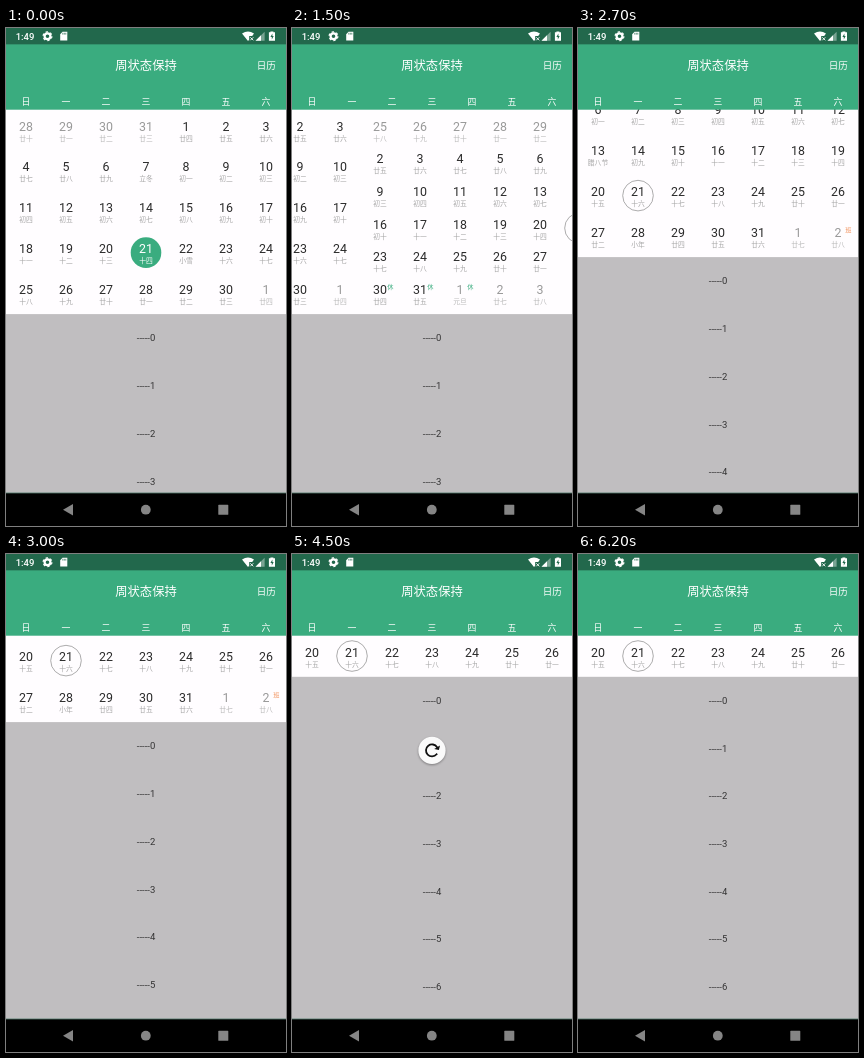
These frames come from a looping animation (280 px wide and 498 px high, 8000 ms). An HTML page:

```html
<!DOCTYPE html>
<html lang="zh-CN">
<head>
<meta charset="utf-8">
<style>
html, body { margin: 0; width: 100%; height: 100%; overflow: hidden; background: #000; }
svg { display: block; }
text { font-family: Roboto, "Noto Sans CJK SC", "Noto Sans CJK", sans-serif; text-anchor: middle; }
#disc { filter: drop-shadow(0 1px 1.2px rgba(0, 0, 0, .35)); }
</style>
</head>
<body>
<svg id="stage" width="280" height="498" viewBox="0 0 280 498">
  <rect y="81" width="280" height="206" fill="#fffdff"/>
  <g id="pager"></g>
  <svg id="list" width="280" height="460">
    <rect width="280" height="460" fill="#c0bec0"/>
    <g id="items" font-size="9.5" fill="#333"></g>
    <g id="spinner">
      <circle id="disc" r="13.6" fill="#fafafa"/>
      <path id="arc" fill="none" stroke="#111" stroke-width="1.8" stroke-linecap="square"/>
      <path id="arrow" d="M-3.4 0H3.4L0 3.4Z" fill="#111"/>
    </g>
  </svg>
  <rect width="280" height="81.7" fill="#3aac7f"/>
  <rect width="280" height="16.35" fill="#22684c"/>
  <g id="header" fill="#fff">
    <text x="19" y="11.8" font-size="9.5" font-weight="500">1:49</text>
    <circle cx="41.5" cy="8.2" r="2.9" fill="none" stroke="#fff" stroke-width="2.2"/>
    <circle cx="41.5" cy="8.2" r="4.4" fill="none" stroke="#fff" stroke-width="1.2" stroke-dasharray="2.3 2.3"/>
    <path d="M56.5 3.7H61.3V12.6H54.2V6.2Z"/>
    <path d="M56.8 4.8v1.8M58.3 4.8v1.8M59.8 4.8v1.8" stroke="#22684c" stroke-width=".7"/>
    <path d="M236 5.6Q242 1.6 248 5.6L246.2 7.9H243.2V11.7L242 13Z"/>
    <path d="M244.3 9.3l3 3m0-3l-3 3" stroke="#fff" stroke-width=".9"/>
    <path d="M249.5 12.8L258.6 3.7V12.8Z" opacity=".4"/>
    <path d="M249.5 12.8L255 7.3V12.8Z"/>
    <path d="M264.4 4.3V3.4H267.4V4.3H269V12.8H262.9V4.3Z"/>
    <path d="M266.4 5.5L264.4 9H265.8V11.6L267.7 8.1H266.4Z" fill="#22684c"/>
    <text x="140" y="41.8" font-size="12.3">周状态保持</text>
    <text x="260.3" y="40.7" font-size="9.5">日历</text>
  </g>
  <rect y="464.7" width="280" height="1" fill="#245a48"/>
  <rect y="465.4" width="280" height="33" fill="#000"/>
  <g fill="#858585">
    <path d="M57 481.7L67 476V487.4Z"/>
    <circle cx="139.8" cy="481.7" r="4.9"/>
    <rect x="212.3" y="476.8" width="10" height="10" rx=".6"/>
  </g>
</svg>
<script>
const NS = 'http://www.w3.org/2000/svg';
const $ = id => document.getElementById(id);

function add(parent, tag, attrs, content = '') {
  const node = document.createElementNS(NS, tag);
  for (const key in attrs) node.setAttribute(key, attrs[key]);
  node.textContent = content;
  parent.append(node);
  return node;
}

const DAY = 864e5, GREEN = '#3aac7f';
const utc = (y, m, d) => Date.UTC(y, m - 1, d);
const newMoons = [utc(2018, 10, 9), utc(2018, 11, 8), utc(2018, 12, 7), utc(2019, 1, 6)];
const festivals = {
  '11-7': '立冬', '11-22': '小雪', '12-7': '大雪', '12-22': '冬至',
  '1-1': '元旦', '1-13': '腊八节', '1-28': '小年'
};
const marks = { '12-29': '班', '12-30': '休', '12-31': '休', '1-1': '休', '2-2': '班' };

function lunarName(date) {
  const n = (date - newMoons.filter(m => m <= date).pop()) / DAY + 1;
  return n === 10 ? '初十' : '初十廿卅'[Math.floor(n / 10)] + '十一二三四五六七八九'[n % 10];
}

function buildMonth(page, year, month, rows, today) {
  const g = add($('pager'), 'g', { transform: `translate(${page * 280} 0)` });
  const first = utc(year, month, 1);
  const start = first - new Date(first).getUTCDay() * DAY;
  for (let i = 0; i < rows * 7; i++) {
    const time = start + i * DAY, date = new Date(time);
    const m = date.getUTCMonth() + 1, d = date.getUTCDate(), key = m + '-' + d;
    const x = 20 + i % 7 * 40;
    const y = 102 + Math.floor(i / 7) * 163.5 / (rows - 1);
    const inMonth = m === month, picked = inMonth && d === 21, solid = picked && today;
    if (picked) add(g, 'circle', {
      cx: x, cy: y, r: 15.3, fill: solid ? GREEN : 'none',
      stroke: solid ? 'none' : '#888', 'stroke-width': .7
    });
    add(g, 'text', {
      x, y: y + .5, 'font-size': 12.4,
      fill: solid ? '#fff' : inMonth ? '#2b2b2b' : '#999'
    }, d);
    add(g, 'text', {
      x, y: y + 10.6, 'font-size': 6.8,
      fill: solid ? '#fff' : inMonth ? '#a5a5a5' : '#b8b8b8'
    }, festivals[key] || lunarName(time));
    if (marks[key]) add(g, 'text', {
      x: x + 10.3, y: y - 4.5, 'font-size': 6.2,
      fill: marks[key] === '休' ? GREEN : '#f08a50'
    }, marks[key]);
  }
}

buildMonth(0, 2018, 11, 5, true);
buildMonth(1, 2018, 12, 6);
buildMonth(2, 2019, 1, 5);
[...'日一二三四五六'].forEach((c, i) =>
  add($('header'), 'text', { x: 20 + i * 40, y: 76.6, 'font-size': 8.9 }, c));
for (let i = 0; i < 10; i++)
  add($('items'), 'text', { x: 140, y: 27.4 + i * 47.7 }, '-----' + i);

// Piecewise linear track of [time, value] points.
function track(t, points) {
  if (t <= points[0][0]) return points[0][1];
  for (let i = 1; i < points.length; i++) {
    const [t0, a] = points[i - 1], [t1, b] = points[i];
    if (t <= t1) return a + (b - a) * (t - t0) / (t1 - t0);
  }
  return points[points.length - 1][1];
}

const swipe = [[1100, 0], [1200, 18], [1500, 212], [1600, 266], [1700, 290], [1900, 535], [2000, 560]];
const collapse = [[2300, 0], [2700, 57], [3000, 118], [3200, 150], [3300, 161], [3400, 163.5]];
const scroll = [[3500, 0], [3600, 16], [3700, 35], [4200, 35], [4300, 14], [4400, 0]];
const pull = [[4300, -15], [4400, 12], [4500, 73.8], [4600, 73.8], [4700, 46], [4800, 29.8]];
const SPIN_START = 4830, SPIN_CYCLE = 1332;

const smooth = x => x * x * (3 - 2 * x);

function drawSpinner(t) {
  const visible = t >= 4400 && t < 6200;
  $('spinner').setAttribute('display', visible ? 'inline' : 'none');
  if (!visible) return;
  const scale = track(t, [[6040, 1], [6190, 0]]);
  $('spinner').setAttribute('transform', `translate(140 ${track(t, pull)}) scale(${scale})`);

  const spinning = t >= SPIN_START;
  let from = track(t, [[4400, -60], [4500, 40], [4800, 80]]);
  let to = from + track(t, [[4400, 120], [4500, 288]]);
  if (spinning) {
    const total = (t - SPIN_START) / SPIN_CYCLE, turn = Math.floor(total), p = total - turn;
    const base = -96 + 292 * total + 284 * turn;
    from = base + (p > .5 ? 284 * smooth(2 * p - 1) : 0);
    to = base + 4 + 284 * (p < .5 ? smooth(2 * p) : 1);
  }
  const r = 6, rad = Math.PI / 180;
  const at = a => `${r * Math.cos(a * rad)} ${r * Math.sin(a * rad)}`;
  $('arc').setAttribute('d', `M${at(from)}A${r} ${r} 0 ${to - from > 180 ? 1 : 0} 1 ${at(to)}`);
  $('arrow').setAttribute('display', spinning ? 'none' : 'inline');
  $('arrow').setAttribute('transform', `rotate(${to}) translate(${r} 0)`);
}

function render(t) {
  const fold = track(t, collapse);
  $('pager').setAttribute('transform', `translate(${-track(t, swipe)} ${-Math.min(fold, 122.6)})`);
  $('list').setAttribute('y', 286.1 - fold);
  $('items').setAttribute('transform', `translate(0 ${-track(t, scroll)})`);
  drawSpinner(t);
}

// The screen refreshes ten times a second.
const origin = performance.now();
function tick() {
  const t = (performance.now() - origin) % 8000;
  render(Math.floor(t / 100) * 100);
  requestAnimationFrame(tick);
}
tick();
</script>
</body>
</html>
```
